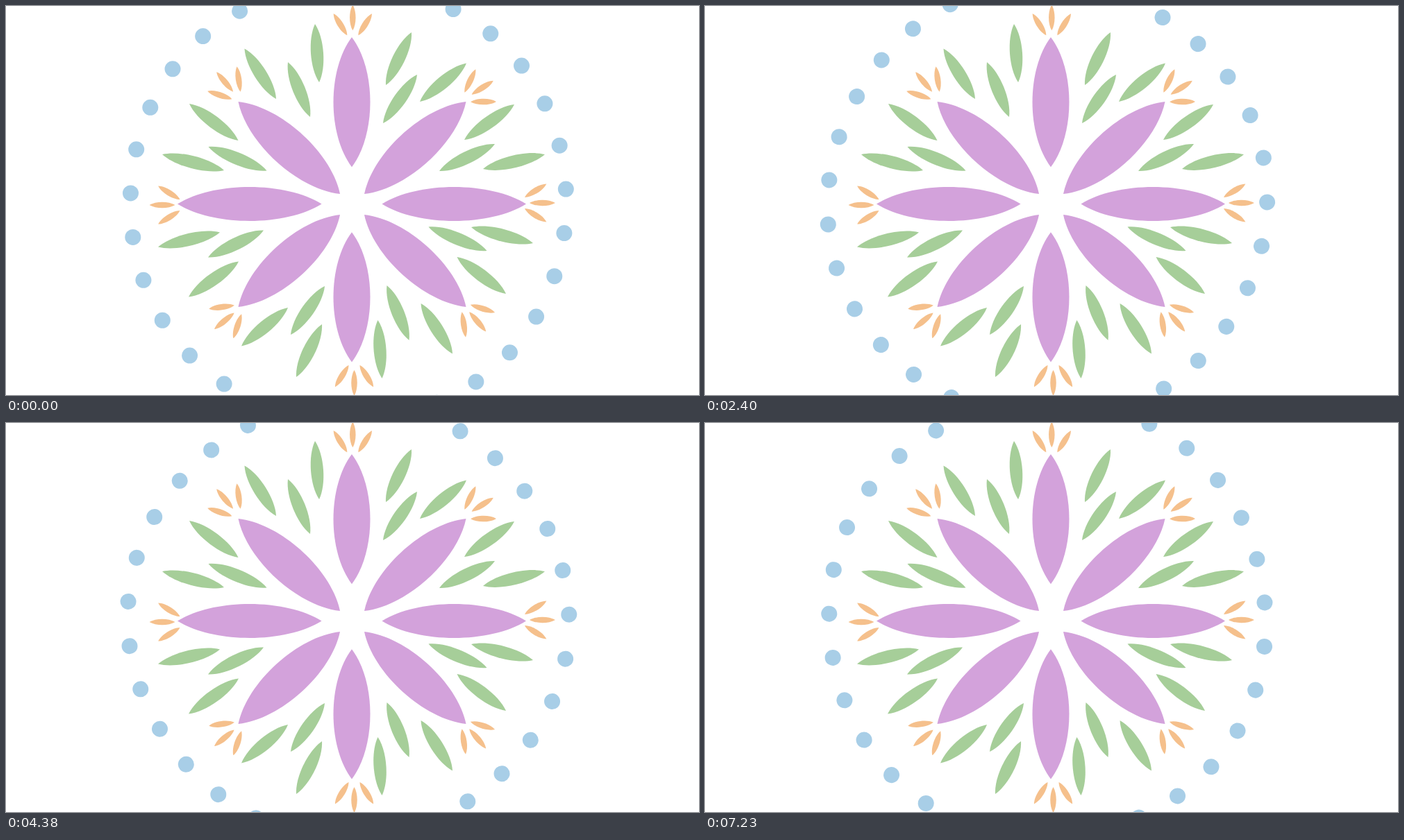
These frames come from a looping animation (998x561 px, 7.26 s). An HTML page:

```html
<!DOCTYPE html>
<html lang="en">
<head>
<meta charset="utf-8">
<title>Flower mandala</title>
<style>
  html, body { margin: 0; width: 100%; height: 100%; overflow: hidden; background: #fff; }
  svg { display: block; width: 100%; height: 100%; }
</style>
</head>
<body>
<svg viewBox="0 0 998 561">
  <g id="ring" fill="#a8cee7"></g>
  <g id="leaves" fill="#a6ce99"></g>
  <g id="petals" fill="#d3a2db"></g>
  <g id="sprigs" fill="#f5c08c"></g>
</svg>
<script>
const LOOP = 7260, STEP = 30, DEGREES_PER_MS = 1 / 90;
const CX = 498, CY = 286, PIVOT = [493, 282.9], DOTS = 31;
const rad = degrees => degrees * Math.PI / 180;
const byId = id => document.getElementById(id);

function add(parent, tag, attrs) {
  const node = document.createElementNS('http://www.w3.org/2000/svg', tag);
  for (const key in attrs) node.setAttribute(key, attrs[key]);
  byId(parent).append(node);
}

// Pointed oval between two tips, a little fuller than a plain arc.
function lens(parent, x1, y1, x2, y2, width) {
  const dx = x2 - x1, dy = y2 - y1, bulge = width * 2 / 3 / Math.hypot(dx, dy);
  const handle = (along, side) =>
    `${x1 + dx * along - dy * bulge * side} ${y1 + dy * along + dx * bulge * side}`;
  add(parent, 'path', {
    d: `M${x1} ${y1}C${handle(.25, 1)} ${handle(.75, 1)} ${x2} ${y2}` +
       `C${handle(.75, -1)} ${handle(.25, -1)} ${x1} ${y1}Z`
  });
}

// Petals mirror across both axes.
for (const side of [-1, 1]) {
  const petal = (x, y, nearX, nearY, farX, farY, width) =>
    lens('petals', x + nearX, y + nearY, x + farX, y + farY, width);
  petal(CX, 279.2, 0, side * 47, 0, side * 234.3, 53);
  petal(CX, 285.5, side * 43.5, 0, side * 251, 0, 49);
  for (const flip of [-1, 1])
    petal(CX + .5, CY, side * 17.5, flip * 15, side * 164, flip * 148, 54);
}

// Each spray of three leaves repeats, turned half way round, on the opposite side.
const sprays = [
  { shift: [6, 1], leaves: [[49, -172, 86, -248], [45, -117, 94, -187], [98, -148, 165, -203.5]] },
  { shift: [-1, -10.5], leaves: [[162, -93, 234, -144], [126, -48, 206, -87], [189, -51, 278, -72]] },
  { shift: [-9.5, -9], leaves: [[-47, -176, -53, -260], [-60, -126, -92, -205], [-109, -152, -154.5, -224.5]] },
  { shift: [-12, -16], leaves: [[-163.5, -92, -234, -145], [-122.5, -48.5, -206.5, -83], [-184, -49, -273, -72]] }
];
for (const { shift: [sx, sy], leaves } of sprays)
  for (const [x1, y1, x2, y2] of leaves) {
    lens('leaves', CX + x1, CY + y1, CX + x2, CY + y2, 18);
    lens('leaves', CX + sx - x1, CY + sy - y1, CX + sx - x2, CY + sy - y2, 18);
  }

// A sprig is three blades fanned around its heading.
function sprig(x, y, heading) {
  for (const side of [-1, 0, 1]) {
    const ahead = side ? 0 : 7, a = rad(heading), b = rad(heading + side * 32);
    const bx = x + ahead * Math.cos(a) - side * 8 * Math.sin(a);
    const by = y + ahead * Math.sin(a) + side * 8 * Math.cos(a);
    lens('sprigs', bx, by, bx + 37 * Math.cos(b), by + 37 * Math.sin(b), 8.5);
  }
}
sprig(747, 284, 0);
sprig(662.7, 436, 49.6);
sprig(501.5, 518, 90);
sprig(334, 438, 140.5);
sprig(250.5, 287, 180);
sprig(331.5, 129, 230);
sprig(499.3, 42.3, 270);
sprig(664.7, 131.5, 327.5);

// The dots sit evenly on a slightly squared circle.
for (let i = 0; i < DOTS; i++) {
  const a = rad(-61.5 + i * 360 / DOTS);
  const radius = 315.9 - 2.1 * Math.cos(4 * a - .05);
  add('ring', 'circle', {
    cx: PIVOT[0] + radius * Math.cos(a), cy: PIVOT[1] + radius * Math.sin(a), r: 11.5
  });
}

function draw(ms) {
  const time = Math.floor((ms % LOOP) / STEP) * STEP;
  byId('ring').setAttribute('transform', `rotate(${time * DEGREES_PER_MS} ${PIVOT})`);
}

const start = performance.now();
function tick() {
  draw(performance.now() - start);
  requestAnimationFrame(tick);
}
tick();
</script>
</body>
</html>
```
